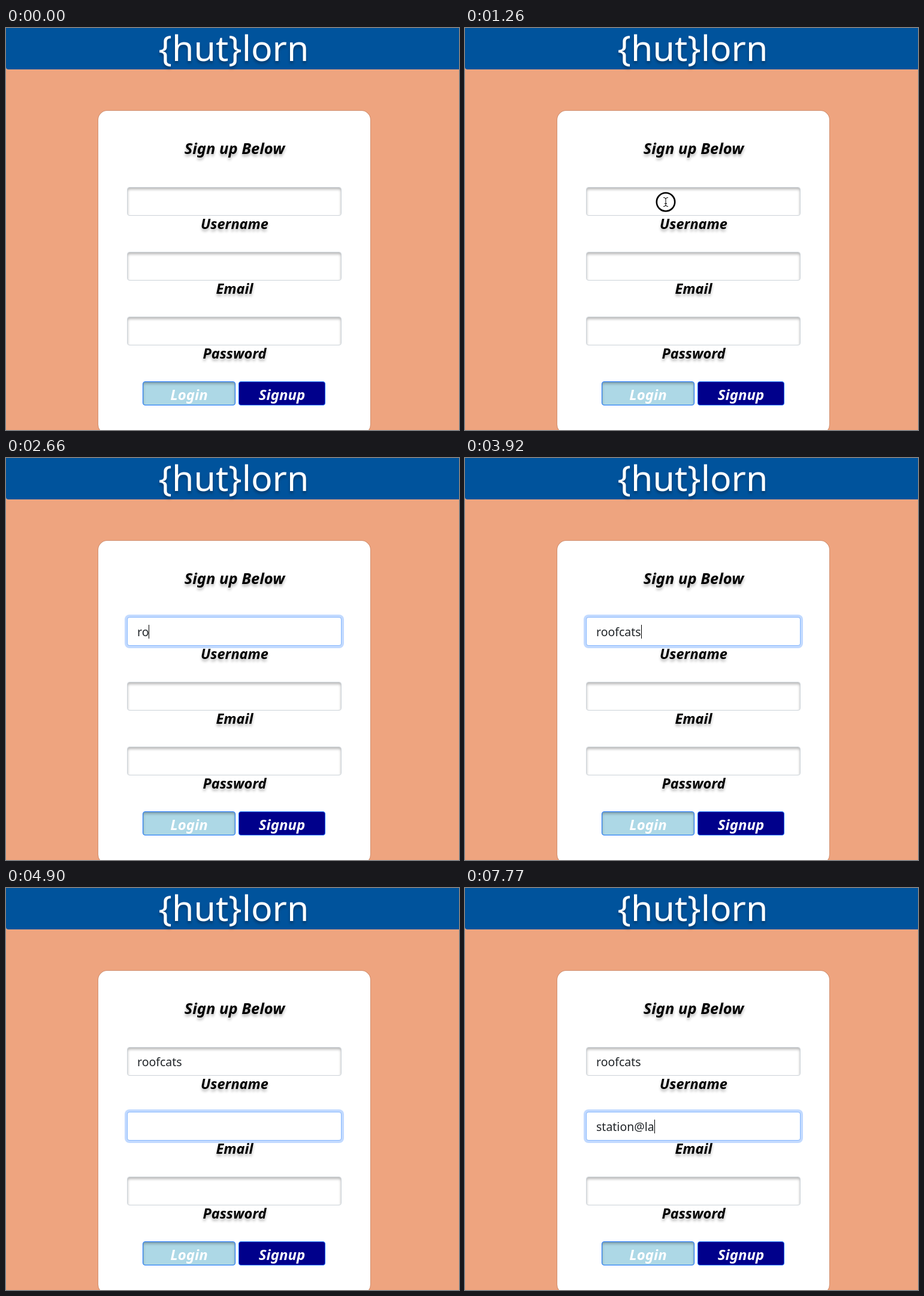
Animation, 756 px wide and 670 px high, one loop 8000 ms. Source, as an HTML page:

```html
<!DOCTYPE html>
<html lang="en">
<head>
<meta charset="utf-8">
<title>Sign up</title>
<style>
  html, body { margin: 0; width: 100%; height: 100%; overflow: hidden; }
  body { position: relative; background: #eea47f; font-family: "Noto Sans", "Open Sans", sans-serif; }
  body * { box-sizing: border-box; }
  header, main, .label, .field, .ring, .button, #pointer { position: absolute; }

  header {
    left: 0; top: 0; width: 756px; height: 69px; border-radius: 0 0 0 4px;
    background: #00539c; color: #fff; text-align: center;
    font-size: 59px; line-height: 64px; padding-left: 4px;
    text-shadow: 0 4px 4px rgba(0, 0, 0, .3);
  }
  main {
    left: 153px; top: 137px; width: 456px; height: 540px;
    border: 1px solid rgba(0, 0, 0, .125); border-radius: 16px;
    background: #fff; background-clip: padding-box;
  }
  .label, .button { font-style: italic; font-weight: 600; text-align: center; }
  .label {
    left: 153px; width: 457px; font-size: 23.5px; line-height: 40px;
    color: #000; text-shadow: 0 4px 4px rgba(0, 0, 0, .28);
  }
  .title { font-size: 25.5px; }

  .field {
    left: 202px; width: 358px; height: 48px; padding-left: 16px;
    display: flex; align-items: center;
    border: 1px solid #ced4da; border-radius: 4px; background: #fff;
    box-shadow: inset 0 3px 4px rgba(0, 0, 0, .28);
    font-size: 19.5px; color: #212529;
  }
  .ring {
    inset: -1px; border: 1px solid #86b7fe; border-radius: 4px; background: #fff;
    box-shadow: 0 0 0 4px rgba(13, 110, 253, .25); opacity: 0;
    animation: 8s ease-in-out infinite;
  }
  .text { position: relative; white-space: pre; }
  .caret { position: relative; width: 1px; height: 23px; background: #000; }
  #user .ring { animation-name: user-focus; }
  #email .ring { animation-name: email-focus; }
  @keyframes user-focus {
    0%, 16.25% { opacity: 0; }
    18.125%, 54.125% { opacity: 1; }
    55.875%, 100% { opacity: 0; }
  }
  @keyframes email-focus {
    0%, 54.125% { opacity: 0; }
    55.875%, 100% { opacity: 1; }
  }

  .button {
    top: 589px; height: 40px; border: 1px solid #0d6efd; border-radius: 4px;
    color: #fff; font-size: 24px; line-height: 41px;
  }
  .login {
    left: 228px; width: 155px; background: #add8e6;
    box-shadow: inset 0 3px 4px rgba(0, 0, 0, .28);
  }
  .signup { left: 388px; width: 145px; background: #00008b; }

  #pointer {
    left: 0; top: 0; width: 1px; height: 1px; overflow: visible;
    fill: none; stroke: #000; animation: move 8s linear infinite;
  }
  .arrow { fill: #000; stroke: #fff; animation: arrow 8s step-end infinite; }
  .beam { animation: beam 8s step-end infinite; }
  .click { stroke-width: 2.6; animation: click 8s linear infinite; }
  .halo { stroke: #fff; stroke-width: 2.6; }
  @keyframes move {
    0%, .875% { transform: translate(597px, 6px); }
    6.125% { transform: translate(390px, 260px); }
    7%, 9.625% { transform: translate(371px, 276px); }
    10.5%, 100% { transform: translate(335px, 290px); }
  }
  @keyframes arrow {
    0% { visibility: hidden; }
    .875% { visibility: visible; }
    6.125%, 100% { visibility: hidden; }
  }
  @keyframes beam {
    0% { visibility: hidden; }
    6.125% { visibility: visible; }
    26.25%, 100% { visibility: hidden; }
  }
  @keyframes click {
    0%, 13.9% { opacity: 0; }
    15.5%, 16.5% { opacity: 1; }
    17.5%, 100% { opacity: 0; }
  }
</style>
</head>
<body>
  <header>{hut}lorn</header>
  <main></main>

  <div class="label title" style="top:180px">Sign up Below</div>
  <div class="label" style="top:306px">Username</div>
  <div class="label" style="top:414px">Email</div>
  <div class="label" style="top:522px">Password</div>

  <div class="field" id="user" style="top:265px">
    <div class="ring"></div><span class="text"></span><i class="caret"></i>
  </div>
  <div class="field" id="email" style="top:373px">
    <div class="ring"></div><span class="text"></span><i class="caret"></i>
  </div>
  <div class="field" style="top:481px"></div>

  <div class="button login">Login</div>
  <div class="button signup">Signup</div>

  <svg id="pointer">
    <path class="arrow" d="M0 0V15L3.5 12L6 17.5L8.5 16.5L6 11H11Z"/>
    <g class="beam">
      <path class="halo" d="M0-7V7"/>
      <path d="M-4-7.5Q0-7.5 0-5Q0-7.5 4-7.5M0-6V6M-4 7.5Q0 7.5 0 5Q0 7.5 4 7.5M-2 2.5H2"/>
    </g>
    <circle class="click" r="15.2"/>
  </svg>

<script>
  const LOOP = 8000, BLINK = 525, LEAD = 10;

  const fields = [
    { id: "user", value: "roofcats", focus: 1295, blur: 4370,
      keys: [2170, 2660, 2870, 3080, 3570, 3710, 3780, 3920] },
    { id: "email", value: "station@la", focus: 4370, blur: Infinity,
      keys: [5110, 5180, 5460, 5600, 5880, 6020, 6110, 7210, 7560, 7770] }
  ].map(field => {
    const box = document.getElementById(field.id);
    return { ...field, text: box.querySelector(".text"), caret: box.querySelector(".caret") };
  });

  function drawField({ value, focus, blur, keys, text, caret }, t) {
    const typed = keys.filter(key => key <= t).length;
    const lastInput = typed ? keys[typed - 1] : focus;
    const focused = t >= focus && t < blur;
    const blinkOn = Math.floor((t - lastInput) / BLINK) % 2 === 0;
    text.textContent = value.slice(0, typed);
    caret.style.visibility = focused && blinkOn ? "visible" : "hidden";
  }

  let start;
  function draw(now) {
    start ??= now;
    const t = (now - start + LEAD) % LOOP;
    fields.forEach(field => drawField(field, t));
    requestAnimationFrame(draw);
  }
  requestAnimationFrame(draw);
</script>
</body>
</html>
```
